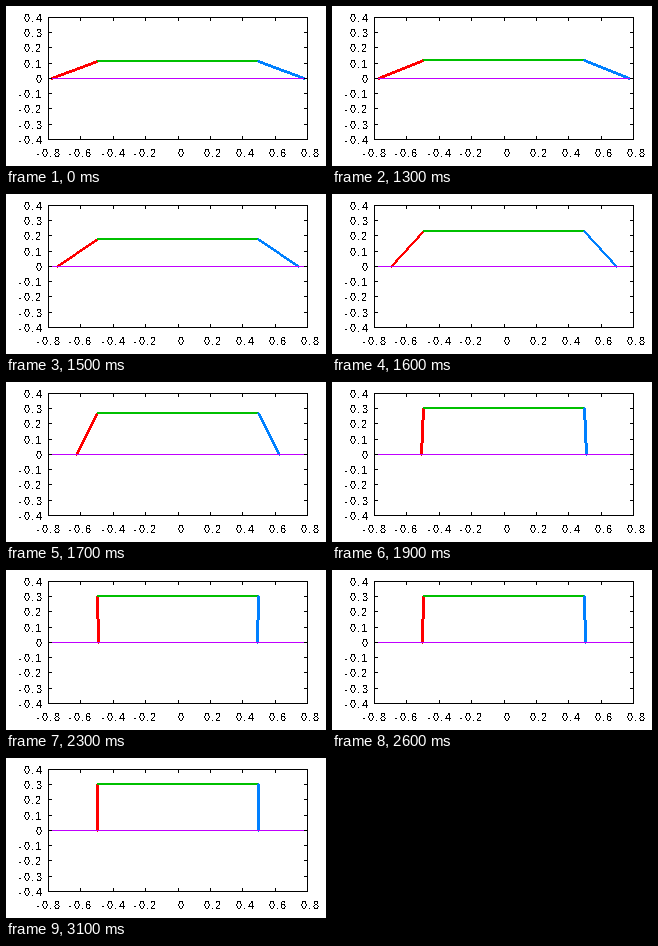
These frames come from a looping animation (320x160 px, 6 s). A matplotlib script:

```python
import numpy as np
import matplotlib.pyplot as plt
from matplotlib.animation import FuncAnimation

plt.rcParams.update({
    "text.antialiased": False,
    "text.hinting": "native",
    "text.hinting_factor": 1,
    "font.family": "Liberation Sans",
    "path.simplify": False,
})

W, H, DPI = 320, 160, 100
LEFT, RIGHT, TOP, BOTTOM = 42, 301, 11, 133
STEP, FRAMES = 100, 60
ARM = 0.3    # leg length
HALF = 0.5   # half the length of the top bar
LEAN = 68.2  # starting lean of the legs, degrees from upright
TICK = 3
PT = 72 / DPI

fig = plt.figure(figsize=(W / DPI, H / DPI), dpi=DPI, facecolor="white")
ax = fig.add_axes([0, 0, 1, 1])
ax.set_xlim(0, W)
ax.set_ylim(H, 0)
ax.axis("off")


def px(x):
    return round(LEFT + (x + 0.8) / 1.6 * (RIGHT - LEFT))


def py(y):
    return round(BOTTOM - (y + 0.4) / 0.8 * (BOTTOM - TOP))


def line(color, z):
    return ax.plot([], [], color=color, lw=PT, antialiased=False,
                   solid_capstyle="projecting", snap=False, zorder=z)[0]


def set_runs(item, x0, y0, x1, y1):
    """Show straight one-pixel-wide runs, both end pixels included."""
    x0, y0, x1, y1 = np.broadcast_arrays(*np.atleast_1d(x0, y0, x1, y1))
    gap = np.full(x0.shape, np.nan)
    item.set_data(np.column_stack([x0, x1, gap]).ravel() + 0.5,
                  np.column_stack([y0, y1, gap]).ravel() + 0.5)


def stroke(x0, y0, x1, y1, color="black", z=7):
    set_runs(line(color, z), x0, y0, x1, y1)


def set_leg(item, x0, y0, x1, y1):
    """Three-pixel line stepped pixel by pixel, with a small cross at each end."""
    dx, dy = abs(x1 - x0), abs(y1 - y0)
    n = max(dx, dy) + 1
    x, y = np.rint(np.linspace((x0, y0), (x1, y1), n)).T
    wide = np.full(n, dy >= dx, dtype=int)
    x, y = np.append(x, [x0, x1]), np.append(y, [y0, y1])
    wide = np.append(wide, 1 - wide[:2])
    set_runs(item, x - wide, y - (1 - wide), x + wide, y + (1 - wide))


def label(text, x, base):
    """Write text in fixed cells six pixels wide."""
    for i, ch in enumerate(text):
        if ch != " ":
            ax.text(x + 6 * i + 2.5, base, ch, size=11 * PT,
                    ha="center", va="baseline", color="black")


def draw_axes():
    for y in (TOP, BOTTOM):
        stroke(LEFT, y, RIGHT, y)
    for x in (LEFT, RIGHT):
        stroke(x, TOP, x, BOTTOM)
    for i in range(-4, 5):
        xv, yv = i / 5, i / 10
        x, y = px(xv), py(yv)
        stroke(x, TOP, x, TOP + TICK)
        stroke(x, BOTTOM - TICK, x, BOTTOM)
        stroke(LEFT, y, LEFT + TICK, y)
        stroke(RIGHT - TICK, y, RIGHT, y)
        xt, yt = f"{xv: g}", f"{yv: g}"
        label(xt, x - 3 * len(xt), 151)
        label(yt, 36 - 6 * len(yt), y + 5)


def lean(t):
    """Lean from upright in degrees: a swing up, then a damped wobble."""
    if t < 1.95:
        u = max(t - 1.2, 0) / 0.767
        return LEAN * (1 + np.cos(np.pi * u ** 1.265)) / 2
    s = t - 1.97
    return -6.6 * np.exp(-3.4 * s) * np.sin(np.pi * s / 0.55)


draw_axes()
stroke(LEFT, py(0), RIGHT, py(0), "#c000ff", 6)
left_leg = line("#ff0000", 3)
bar = line("#00c000", 4)
right_leg = line("#0080ff", 5)


def update(n):
    a = np.radians(lean(n * STEP / 1000))
    foot = HALF + ARM * np.sin(a)
    top, ground = py(ARM * np.cos(a)), py(0)
    set_leg(left_leg, px(-foot), ground, px(-HALF), top)
    set_leg(right_leg, px(foot), ground, px(HALF), top)
    set_runs(bar, px(-HALF), [top - 1, top], px(HALF), [top - 1, top])
    return left_leg, bar, right_leg


anim = FuncAnimation(fig, update, frames=FRAMES, interval=STEP,
                     repeat=True, repeat_delay=0, blit=False)
plt.show()
```
